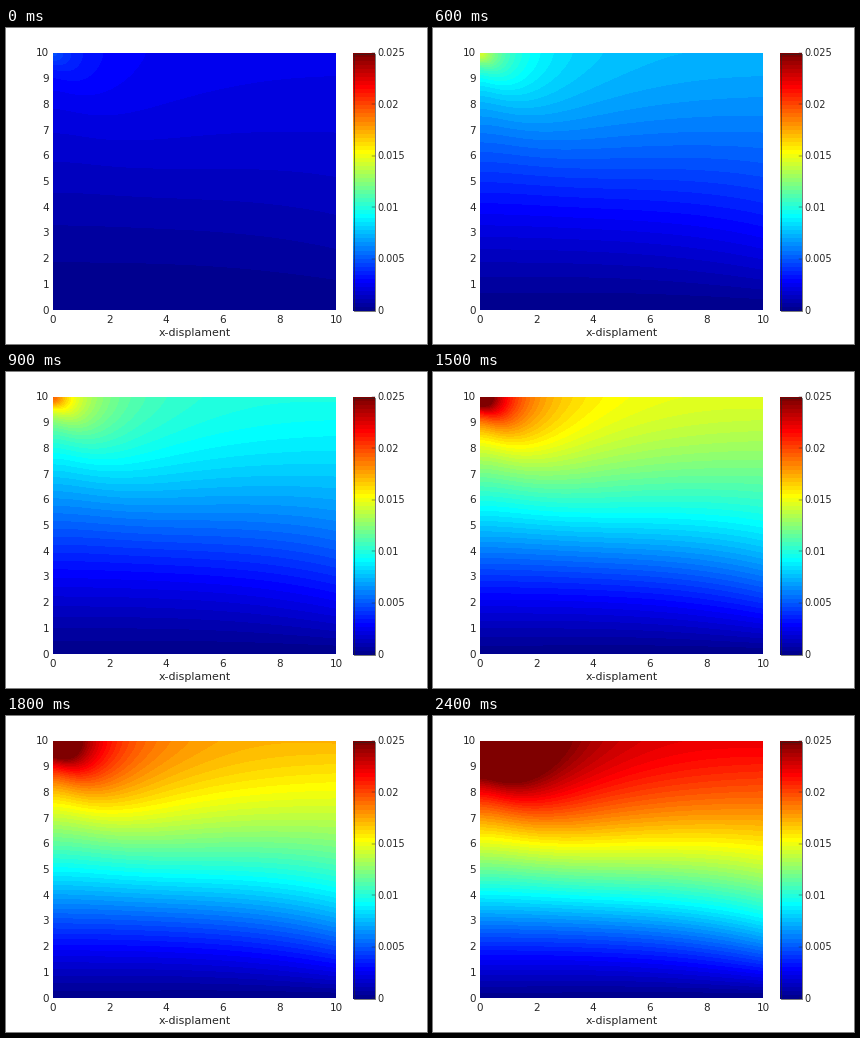
Write a matplotlib script that moves like this. It is 421 px wide and 316 px high and loops after 2700 ms.

```python
import numpy as np
import matplotlib.pyplot as plt
from matplotlib.animation import FuncAnimation
from matplotlib.colors import ListedColormap
from matplotlib.patches import Rectangle

W, H, DPI = 421, 316, 64
PX = 72 / DPI
LEFT, RIGHT, TOP, BOTTOM = 47, 330, 25, 282
BAR_LEFT, BAR_RIGHT = 347, 369
STEPS, LEVELS = 9, 64
INK = "#262626"

plt.rcParams["font.family"] = "DejaVu Sans"


def jet_map(count=LEVELS):
    index = np.arange(1, count + 1)

    def ramp(shift):
        p = index + shift
        return np.clip(np.minimum(p, 48 - p) / 16, 0, 1)

    return ListedColormap(np.column_stack([ramp(-24), ramp(-8), ramp(8)]))


def displacement(x, y):
    """Colour levels reached per load step on a block loaded at its top left."""
    s, t = x / 10, y / 10
    depth2 = (10 - y) ** 2
    r2 = x**2 + depth2 + 0.064
    shear = 3.89 * t + 9.43 * t**2 - 7.23 * t**3 - 0.14
    free_edge = s**3 * (7.2 * t * (1 - t) * (0.72 - t) + 0.2 * t)
    corner_peak = 1.15 * np.log(1 + 16 / r2)
    below_load = 1.35 * t**1.5 * (depth2 / r2) ** 3
    return shear + free_edge + corner_peak - below_load


def band(values):
    return np.clip(np.floor(values), 0, LEVELS - 1)


cols = (np.arange(RIGHT - LEFT) + 0.5) / (RIGHT - LEFT) * 10
rows = 10 - (np.arange(BOTTOM - TOP) + 0.5) / (BOTTOM - TOP) * 10
field = displacement(*np.meshgrid(cols, rows))

fig = plt.figure(figsize=(W / DPI, H / DPI), dpi=DPI, facecolor="white")
ax = fig.add_axes([0, 0, 1, 1])
cmap = jet_map()


def picture(data, left, right, bottom):
    return ax.imshow(data, cmap=cmap, vmin=-0.5, vmax=LEVELS - 0.5,
                     extent=(left, right, bottom, TOP),
                     interpolation="nearest", aspect="auto")


def label(x, y, text, px=10.4, ha="center"):
    ax.text(x, y, text, fontsize=px * PX, color=INK, ha=ha,
            va="center_baseline")


plot = picture(band(field), LEFT, RIGHT, BOTTOM)
picture(np.arange(LEVELS)[::-1, None], BAR_LEFT, BAR_RIGHT, BOTTOM + 1)
ax.add_patch(Rectangle((BAR_LEFT + 0.5, TOP + 0.5), BAR_RIGHT - BAR_LEFT - 1,
                       BOTTOM - TOP, fill=False, ec=INK, lw=0.6 * PX))

for n in range(0, 11, 2):
    label(LEFT + (RIGHT - LEFT) * n / 10, 291, str(n))
for n in range(11):
    label(43, BOTTOM - (BOTTOM - TOP) * n / 10 - 0.5, str(n), ha="right")
for n in range(6):
    y = BOTTOM - (BOTTOM - TOP) * n / 5
    label(371, y - 0.5, f"{n * 0.005:g}", px=9.8, ha="left")
    ax.plot([BAR_RIGHT - 3, BAR_RIGHT], [y, y], color=INK, lw=0.5)
label((LEFT + RIGHT) / 2, 304.5, "x-displament", px=11)

ax.set_xlim(0, W)
ax.set_ylim(H, 0)
ax.axis("off")


def update(step):
    plot.set_data(band(field * (step + 1)))
    return [plot]


anim = FuncAnimation(fig, update, frames=STEPS, interval=300, repeat=True,
                     repeat_delay=0, blit=False)
plt.show()
```
